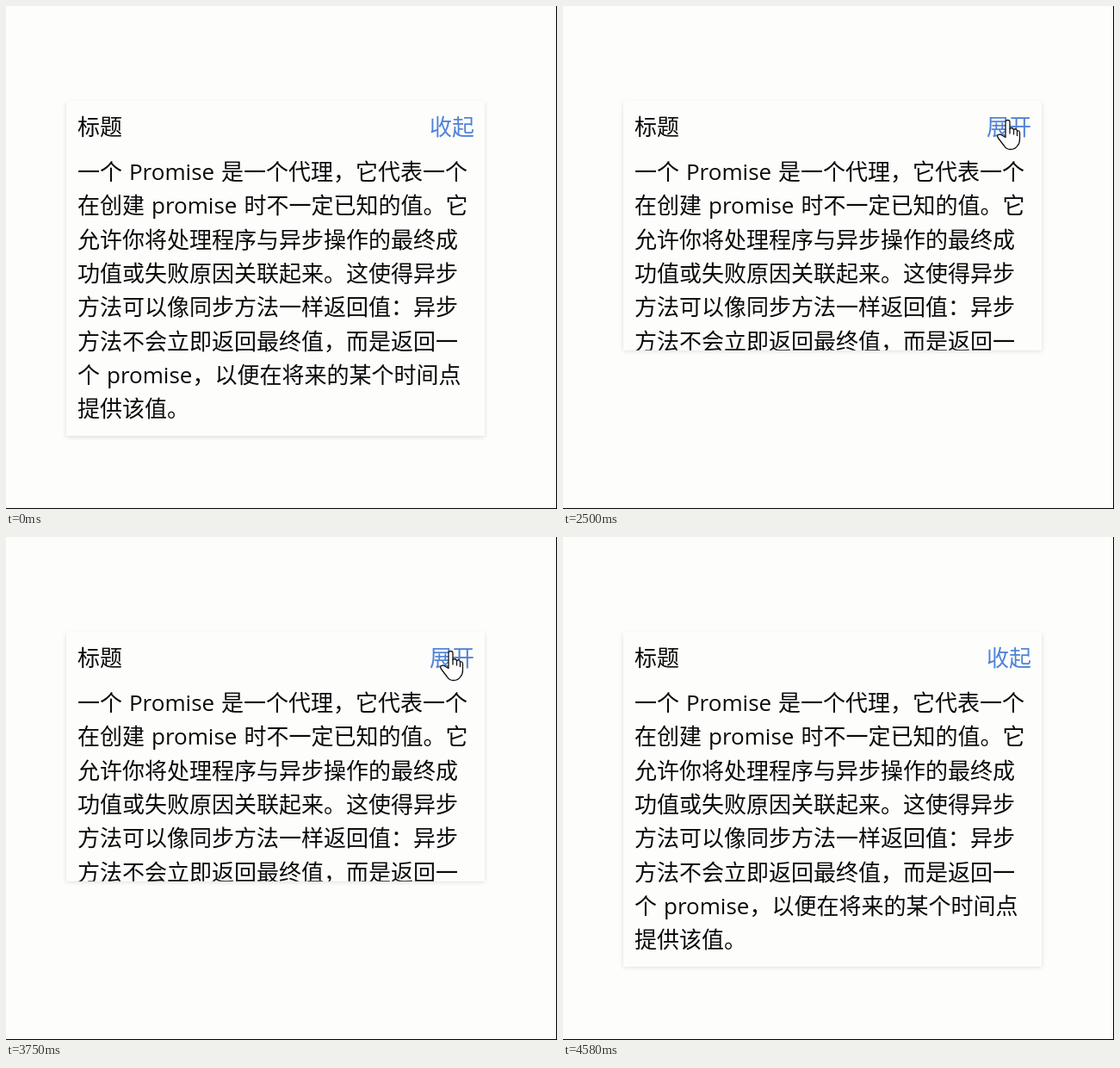
Animation, 640 px wide and 584 px high, one loop 5.33 s. Source, as an HTML page with a canvas:

```html
<!DOCTYPE html>
<html lang="zh-CN">
<head>
<meta charset="utf-8">
<title>展开与收起</title>
<style>
  html, body { margin: 0; width: 100%; height: 100%; overflow: hidden; background: #fdfdfc; }
  canvas { display: block; width: 640px; height: 584px; }
</style>
</head>
<body>
<canvas id="stage" width="640" height="584"></canvas>
<script>
const ctx = document.getElementById('stage').getContext('2d');
const LOOP = 5330, TICK = 1000 / 12, DURATION = 353;
const PAPER = '#fdfdfc', INK = '#0a0a0a', LINK = '#4f83d6';
const FONT = '26px "Open Sans", "Noto Sans CJK SC", "Noto Sans CJK", sans-serif';
const CARD = { x: 70, y: 110, w: 486, head: 63, body: 326 };

const LINES = [
  '一个 Promise 是一个代理，它代表一个',
  '在创建 promise 时不一定已知的值。它',
  '允许你将处理程序与异步操作的最终成',
  '功值或失败原因关联起来。这使得异步',
  '方法可以像同步方法一样返回值：异步',
  '方法不会立即返回最终值，而是返回一',
  '个 promise，以便在将来的某个时间点',
  '提供该值。'
];

// Each click toggles the card: start time in ms, state after it.
const CLICKS = [
  { at: 2365, open: false },
  { at: 2916, open: true },
  { at: 3615, open: false },
  { at: 4235, open: true }
];

// Pointer stops: tick, position, shape.
const POINTER = [
  [9, 336, 407, drawBeam],
  [10, 419, 343, drawBeam],
  [22, 501, 268, drawBeam],
  [23, 509, 212, drawBeam],
  [24, 514, 166, drawHand],
  [25, 518, 146, drawHand],
  [26, 517, 136, drawHand],
  [27, 516.5, 132.5, drawHand],
  [55, 0, 0, null]
];

// cubic-bezier(.42, 0, .58, 1), solved by bisection
function easeInOut(p) {
  if (p <= 0) return 0;
  if (p >= 1) return 1;
  let lo = 0, hi = 1;
  for (let i = 0; i < 24; i++) {
    const s = (lo + hi) / 2, r = 1 - s;
    const x = 1.26 * r * r * s + 1.74 * r * s * s + s * s * s;
    if (x < p) lo = s; else hi = s;
  }
  return lo * lo * (3 - 2 * lo);
}

function cardState(time) {
  const click = CLICKS.filter(c => c.at <= time).pop();
  if (!click) return { open: true, amount: 1 };
  const p = easeInOut((time - click.at) / DURATION);
  return { open: click.open, amount: click.open ? p : 1 - p };
}

function drawBeam(x, y) {
  ctx.save();
  ctx.translate(x, y);
  ctx.strokeStyle = '#fffff4';
  ctx.lineWidth = 1.5;
  ctx.beginPath();
  ctx.moveTo(0, -13);
  ctx.lineTo(0, 13);
  for (const end of [-13, 13]) {
    ctx.moveTo(-5, end);
    ctx.lineTo(5, end);
  }
  ctx.stroke();
  ctx.restore();
}

function drawHand(x, y) {
  ctx.save();
  ctx.translate(x, y);
  ctx.beginPath();
  ctx.moveTo(-2.5, 20);
  ctx.lineTo(-2.5, 2.5);
  ctx.quadraticCurveTo(-2.5, 0, 0, 0);
  ctx.quadraticCurveTo(2.5, 0, 2.5, 2.5);
  ctx.lineTo(2.5, 10);
  ctx.quadraticCurveTo(5.5, 8, 7, 11);
  ctx.quadraticCurveTo(10, 9, 11, 12.5);
  ctx.quadraticCurveTo(14, 11.5, 14, 15);
  ctx.lineTo(14, 22);
  ctx.quadraticCurveTo(14, 27, 11.5, 29.5);
  ctx.quadraticCurveTo(9, 34, 3, 34);
  ctx.quadraticCurveTo(-1.5, 34, -4, 30);
  ctx.lineTo(-10.5, 21.5);
  ctx.quadraticCurveTo(-13, 18, -11, 17);
  ctx.quadraticCurveTo(-8.5, 16, -6, 18);
  ctx.closePath();
  ctx.fillStyle = '#fefefe';
  ctx.strokeStyle = '#111';
  ctx.lineWidth = 1.3;
  ctx.lineJoin = 'round';
  ctx.fill();
  ctx.stroke();
  ctx.beginPath();
  for (const [fx, top] of [[2.5, 10], [7, 11], [11, 12.5]]) {
    ctx.moveTo(fx, top);
    ctx.lineTo(fx, top + 6);
  }
  ctx.stroke();
  ctx.restore();
}

function drawCard({ open, amount }) {
  const h = CARD.head + CARD.body * amount;
  ctx.save();
  ctx.shadowColor = 'rgba(20, 20, 50, 0.14)';
  ctx.shadowBlur = 5;
  ctx.shadowOffsetY = 1.5;
  ctx.fillStyle = PAPER;
  ctx.fillRect(CARD.x, CARD.y, CARD.w, h);
  ctx.restore();

  ctx.save();
  ctx.beginPath();
  ctx.rect(CARD.x, CARD.y, CARD.w, h);
  ctx.clip();
  ctx.font = FONT;
  ctx.wordSpacing = '1.2px';
  ctx.fillStyle = INK;
  ctx.fillText('标题', 83, 150);
  if (amount > 0) LINES.forEach((line, i) => ctx.fillText(line, 83, 202 + i * 39.3));
  ctx.fillStyle = LINK;
  ctx.fillText(open ? '收起' : '展开', 492, 150);
  ctx.restore();
}

function render(ms) {
  const tick = Math.floor((ms % LOOP + 4) / TICK);
  ctx.fillStyle = PAPER;
  ctx.fillRect(0, 0, 640, 584);
  drawCard(cardState(tick * TICK));
  const stop = POINTER.filter(p => p[0] <= tick).pop();
  if (stop && stop[3]) stop[3](stop[1], stop[2]);
  ctx.fillStyle = '#000';
  ctx.fillRect(639, 0, 1, 584);
  ctx.fillRect(0, 583, 640, 1);
}

const start = performance.now();
function loop() {
  render(performance.now() - start);
  requestAnimationFrame(loop);
}
loop();
</script>
</body>
</html>
```
